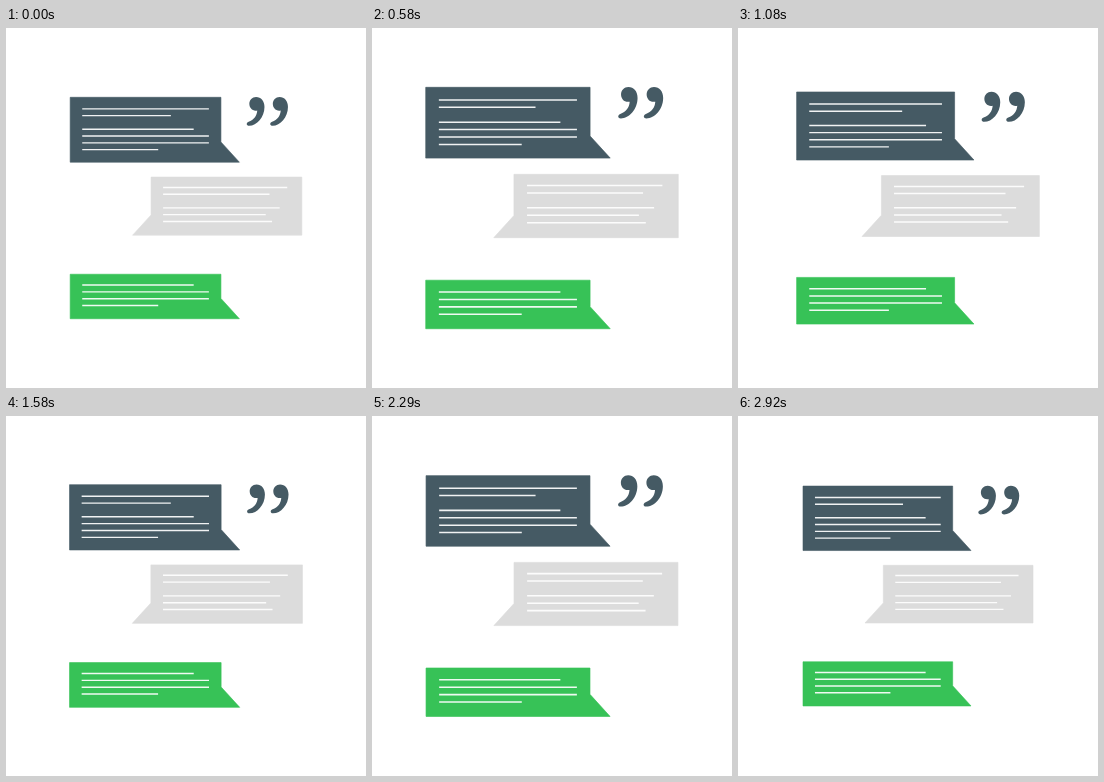
These frames come from a looping animation (360 px wide and 360 px high, 2960 ms). An HTML page:

```html
<!DOCTYPE html>
<html lang="en">
<head>
<meta charset="utf-8">
<title>Chat bubbles</title>
<style>
  html, body { margin: 0; width: 100%; height: 100%; overflow: hidden; background: #fff; }
  svg { display: block; width: 100vw; height: 100vh; }
</style>
</head>
<body>
<svg viewBox="0 0 360 360">
  <g id="chat"></g>
</svg>
<script>
const DARK = '#455a64', GRAY = '#dcdcdc', GREEN = '#37c257';
const LOOP = 2960, STEPS = 71, BEAT = 0.2;
const SMALL = 0.9965, LARGE = 1.097;
const WIDTH = 150.2, MARGIN = 12, ROW = 6.78, TAIL = 20.2;
const chat = document.getElementById('chat');

function add(name, attrs) {
  const el = document.createElementNS('http://www.w3.org/2000/svg', name);
  for (const key in attrs) el.setAttribute(key, attrs[key]);
  chat.append(el);
}

// side is 1 for a tail on the right, -1 on the left;
// paragraphs hold line lengths as shares of the text width
function bubble(color, side, center, top, firstRow, paragraphs) {
  const rows = paragraphs.flatMap((lines, i) => i ? [0, ...lines] : lines);
  const bottom = top + (rows.length - 1) * ROW + 2 * MARGIN;
  const near = center + side * WIDTH / 2, far = center - side * WIDTH / 2;
  add('path', {
    fill: color, stroke: color, 'stroke-width': 0.6, 'stroke-linejoin': 'round',
    d: `M${far} ${top}H${near}V${bottom - TAIL}L${near + side * 18.4} ${bottom}H${far}Z`
  });
  const left = center - WIDTH / 2 + MARGIN, room = WIDTH - 2 * MARGIN;
  rows.forEach((share, i) => {
    if (share) add('path', {
      stroke: '#fff', 'stroke-width': 1.4, 'stroke-opacity': 0.92,
      d: `M${left} ${firstRow + i * ROW}h${room * share}`
    });
  });
}

function quoteMark(x) {
  add('path', {
    transform: `translate(${x} 69.4)`,
    fill: DARK,
    d: 'M9.6 0C14.6 0 18 4 18 10C18 20.4 10.2 28.7 2.8 28.7C-.2 28.7 -.5 25.6 2.2 24.6' +
       'C7.4 22.6 10.4 19 10.8 13.4C6.2 14.4 2.9 11 2.9 6.8C2.9 3 5.8 0 9.6 0Z'
  });
}

const opening = [1, 0.7], closing = [0.88, 1, 1, 0.6];
bubble(DARK, 1, 139.7, 69.7, 81.2, [opening, closing]);
bubble(GRAY, -1, 220.3, 149.2, 159.5, [[0.98, 0.84], [0.92, 0.81, 0.86]]);
bubble(GREEN, 1, 139.7, 246, 256.8, [closing]);
quoteMark(240.2);
quoteMark(263.6);

// Linear beats: grow for one, shrink over two, grow for one, shrink for one
function pulse(phase) {
  const beat = phase / BEAT;
  if (beat < 1) return beat;
  if (beat < 3) return (3 - beat) / 2;
  return 1 - Math.abs(beat - 4);
}

function render(time) {
  const step = Math.floor(((time + 5) % LOOP) * STEPS / LOOP);
  const scale = SMALL + (LARGE - SMALL) * pulse((step + 1) / STEPS);
  chat.setAttribute('transform', `translate(180 180) scale(${scale}) translate(-180 -180)`);
}

const start = performance.now();
function tick() {
  render(performance.now() - start);
  requestAnimationFrame(tick);
}
tick();
</script>
</body>
</html>
```
